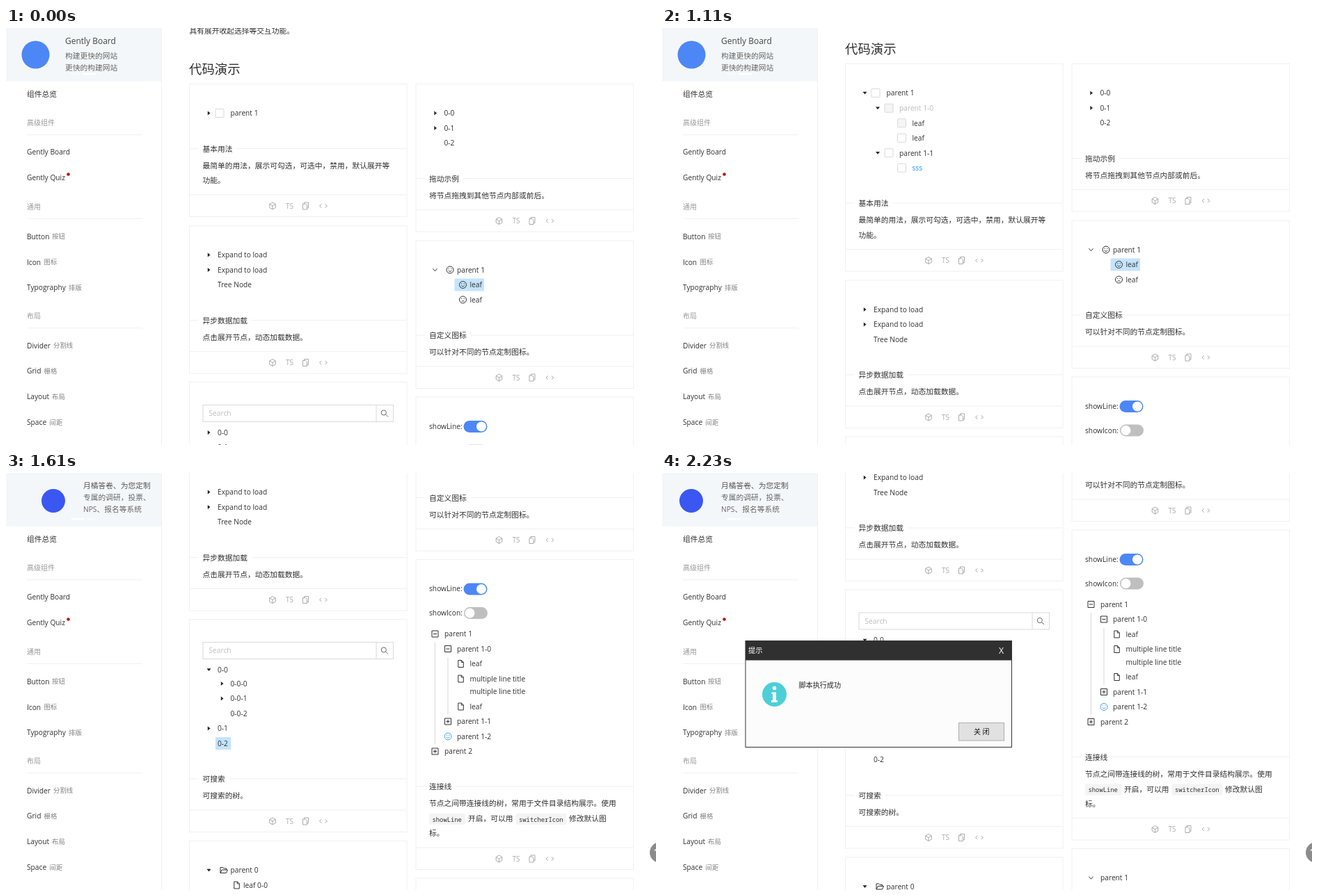
Animation, 934 px wide and 600 px high, one loop 2620 ms. Source, as an HTML page:

```html
<!DOCTYPE html>
<html lang="zh-CN">
<head>
<meta charset="utf-8">
<title>Tree</title>
<style>
html, body { margin: 0; width: 100%; height: 100%; overflow: hidden; background: #fff; }
#stage { display: block; width: 934px; height: 600px; font-family: "Open Sans", "Noto Sans CJK SC", "Noto Sans CJK", sans-serif; }
.mono { font-family: "Noto Sans Mono", "Noto Sans CJK SC", monospace; }
</style>
</head>
<body>
<svg id="stage" viewBox="0 0 934 600"></svg>
<script>
const LOOP = 2620, ROW = 21.5, EM = 10.75;
const INK = '#303030', SOFT = '#999', LINE = '#f0f0f0', BLUE = '#4c87f5', PICK = '#c5e4fd';

// time, scroll, first tree height, search tree height, banner offset, top button, picked row, dialog
const STEPS = [
  [0, 178, 0, 0, 224, 0, '0-2', 0],
  [610, 0, 0, 0, 224, 0, '0-2', 0],
  [810, 27, 30, 0, 224, 0, '0-2', 0],
  [910, 27, 74, 0, 224, 0, '0-2', 0],
  [1010, 27, 86, 0, 224, 0, '0-2', 0],
  [1110, 207, 107.5, 0, 224, 0, '0-2', 0],
  [1210, 400, 107.5, 0, 224, 0, '0-2', 0],
  [1310, 567, 107.5, 0, 224, 0, '0-2', 0],
  [1410, 584.5, 107.5, 0, 224, 0, '0-2', 0],
  [1510, 584.5, 107.5, 45, 120, 1, '0-2', 0],
  [1610, 584.5, 107.5, 63, 26, 1, '0-2', 0],
  [1710, 627, 107.5, 64.5, 0, 1, '0-2', 0],
  [1810, 627, 107.5, 119.5, 0, 1, '0-2', 0],
  [1910, 627, 107.5, 129, 0, 1, '0-2', 0],
  [2030, 627, 107.5, 129, 0, 1, '0-0-1-2', 0],
  [2130, 627, 107.5, 129, 0, 1, '0-0-1-2', 1]
];

// drawing helpers; text is placed by its middle height
function text(x, y, str, size = EM, fill = INK, more = '') {
  const body = str.replace(/[!-~][ -~]*/g, m => `<tspan font-size="${size * .95}">${m}</tspan>`);
  return `<text x="${x}" y="${y + size * .36}" font-size="${size}" fill="${fill}" ${more}>${body}</text>`;
}
const rect = (x, y, w, h, fill, more = '') =>
  `<rect x="${x}" y="${y}" width="${w}" height="${h}" fill="${fill}" ${more}/>`;
const circle = (x, y, r, fill, more = '') => `<circle cx="${x}" cy="${y}" r="${r}" fill="${fill}" ${more}/>`;
const path = (x, y, d, stroke, width = 1, fill = 'none') =>
  `<path transform="translate(${x} ${y})" d="${d}" stroke="${stroke}" stroke-width="${width}" fill="${fill}"/>`;
const hline = (x, y, w, color = LINE) => rect(x, y - .5, w, 1, color);
const move = (x, y, body) => `<g transform="translate(${x} ${y})">${body}</g>`;
const clip = (x, y, w, h, body) =>
  h > 0 ? `<svg x="${x}" y="${y}" width="${w}" height="${h}" overflow="hidden">${body}</svg>` : '';

function caret(x, y, open = 0) {
  const turn = open <= 0 ? -90 : open < .95 ? -38 : 0;
  return `<path transform="translate(${x} ${y}) rotate(${turn})" d="M-3-1.7H3L0 2z" fill="#222"/>`;
}
const chevron = (x, y) => path(x, y, 'M-3-1.8L0 1.8L3-1.8', '#333');
const box = (x, y, off) => rect(x - 6, y - 6, 12, 12, off ? '#f5f5f5' : '#fff', 'stroke="#d9d9d9" rx="1"');
const file = (x, y) => path(x, y, 'M-3.7-5H1L3.8-2.2V5H-3.7zM.8-5V-2H3.8', INK);
const folder = (x, y) => path(x, y, 'M-5 4V-4H-1.5L0-2.5H3.5V-.5M-5 4L-2.8-.5H5.5L3.5 4z', INK);
const square = (x, y, plus) =>
  path(x, y, 'M-4.5-4.5H4.5V4.5H-4.5zM-2.5 0H2.5' + (plus ? 'M0-2.5V2.5' : ''), INK);
const face = (x, y, sad, color = INK) => circle(x, y, 5, 'none', `stroke="${color}"`) +
  path(x, y, 'M-2.4-1.6H-1.2M1.2-1.6H2.4' + (sad ? 'M-2 2.6Q0 .2 2 2.6' : 'M-2.4 .8Q0 4 2.4 .8'), color);
const toggle = (x, y, on) => rect(x, y - 8.5, 34, 17, on ? BLUE : '#bfbfbf', 'rx="8.5"') +
  circle(on ? x + 25.5 : x + 8.5, y, 7, '#fff');
const chip = (x, y, w, str, size) => rect(x, y - 8, w, 16, '#f4f4f4', 'rx="2"') +
  text(x + 4.5, y + .5, str, size, INK, 'class="mono"');

function card(x, top, h, title, lines, body) {
  const end = top + h, cy = end - 15.5, name = end - 76 - ROW * (lines.length - 1);
  return rect(x, top, 312.5, h, '#fff', `stroke="${LINE}"`) +
    hline(x, name - .5, 312) + rect(x + 13, name - 6, title.length * EM + 12, 12, '#fff') +
    text(x + 19, name, title) +
    lines.map((s, i) => text(x + 19, name + 24 + ROW * i, s)).join('') +
    hline(x, end - 31.5, 312) +
    path(x + 119.5, cy, 'M0-5L4.3-2.5V2.5L0 5L-4.3 2.5V-2.5zM-4.3-2.5L0 0L4.3-2.5M0 0V5', '#aaa') +
    text(x + 138.5, cy, 'TS', 10.5, '#aaa') +
    path(x + 167, cy, 'M-2-3V-5H4V3H2M-4-3H0L2-1V5H-4z', '#aaa') +
    path(x + 192.5, cy, 'M-2.5-2.5L-5.5 0L-2.5 2.5M2.5-2.5L5.5 0L2.5 2.5', '#aaa') +
    move(x, top, body);
}

function advert() {
  let s = rect(626, 15.5, 268, 91.5, '#f4f8fb') + rect(633.5, 23, 99.5, 76.5, '#14173a');
  s += path(633.5, 99, 'M0-15Q6-20 12-16T26-15T40-22T54-17T68-18T84-12T99-16V0H0z', '#3f6fd0', .8, '#1c2f66');
  s += `<ellipse cx="713" cy="86" rx="11" ry="6" fill="#2f78cf"/><ellipse cx="713" cy="79" rx="10" ry="6" fill="#57b4ee"/>`;
  s += circle(726, 86, 4, '#f0a24a');
  for (let i = 0; i < 5; i++) s += rect(729, 34 + i * 4, 2.5, 2, '#5fa8e8');
  s += circle(659.5, 46.5, 6, '#fff') + text(668, 46.5, 'MoruPlot', 11.6, '#fff', 'font-weight="700"');
  s += text(638.5, 62.5, '人人可用', 9.5, '#7cc4ff', 'font-weight="700"') +
    text(679, 62.5, '的开源BI工具', 9.2, '#fff', 'font-weight="700"');
  s += rect(741.5, 25, 11, 11, '#fff', 'stroke="#8a9aa5"') + rect(743, 30, 2, 5, '#3f8f5a') +
    rect(746, 27, 2, 8, '#3573c0') + rect(749, 29, 2, 6, '#c0504a');
  s += text(757, 30.5, '个个会做图表小能手', EM, '#222', 'font-weight="700"') + text(854.5, 30.5, '。仅');
  s += text(741, 46.5, '需 5 分钟，数据变图表。众多') + text(741, 62, '精美') +
    text(765.5, 62, 'BI', EM, '#222', 'font-weight="700"') + text(779, 62, '大屏模板等你来选。');
  s += path(745, 87, 'M-3.5 3.5L0-4L3.5 3.5M-4 3.5H0M1 3.5H4M0-1V2', '#999', .9);
  return s + text(752, 87.5, '广告', 9.2, SOFT) + path(886, 100, 'M-2-2L2 2M2-2L-2 2', '#999', .9);
}

const intro = () =>
  text(263.5, 8, 'Tree', 23.5, INK, 'font-weight="600"') + text(322, 8, '树形控件', 23) +
  text(263.5, 47.5, '多层次的结构列表。') + advert() + text(263, 129, '何时使用', 18.4) +
  text(263.5, 161, '文件夹、组织架构、生物分类、国家地区等等，世间万物的大多数结构都是树形结构。使用') +
  chip(693.5, 162, 41.5, '树控件', 10.5) + text(735.5, 161, '可以完整展现其中的层级关系，并') +
  text(263.5, 182.5, '具有展开收起选择等交互功能。') + text(263, 237, '代码演示', 18.4);

function checkTree(h) {
  const kids = [
    [62.5, 'parent 1-0', 1, 1], [81, 'leaf', 0, 1], [81, 'leaf', 0, 0],
    [62.5, 'parent 1-1', 1, 0], [81, 'sss', 0, 0]
  ].map(([x, name, branch, off], i) => {
    const y = ROW * (i + .5);
    return (branch ? caret(x - 16, y, i == 3 ? +(h > 86) : 1) : '') + box(x, y, off) +
      text(x + 15, y, name, EM, off && branch ? '#bbb' : name == 'sss' ? '#1890ff' : INK);
  }).join('');
  const open = Math.min(1, h / 86);
  return caret(28, 42, open) + box(43.5, 42) + text(59, 42, 'parent 1') +
    clip(0, 53, 300, h, `<g opacity="${open}">${move(0, Math.min(0, h - 86), kids)}</g>`);
}

function searchTree(h, picked) {
  const full = ROW * 3, deep = Math.max(0, h - full), open = Math.min(1, h / full), half = ROW / 2;
  const node = (x, y, name) => (name == picked ? rect(x - 3, y - 9, name.length * 5.6 + 5.5, 18, PICK) : '') +
    text(x, y, name);
  const leaves = [0, 1, 2].map(i => node(77.5, half + ROW * i, '0-0-1-' + i)).join('');
  const kids = caret(47, half) + node(59, half, '0-0-0') +
    caret(47, half + ROW, deep / full) + node(59, half + ROW, '0-0-1') +
    clip(0, ROW * 2, 300, deep, `<g opacity="${deep / full}">${move(0, deep - full, leaves)}</g>`) +
    node(59, half + ROW * 2 + deep, '0-0-2');
  return rect(19.5, 33, 273.5, 24, '#fff', 'stroke="#d9d9d9"') + rect(268, 33, 1, 24, '#d9d9d9') +
    text(28, 45, 'Search', EM, '#bfbfbf') +
    path(280.5, 45, 'M1.8 1.8L5 5M2.4-1A3.6 3.6 0 1 1-4.8-1A3.6 3.6 0 1 1 2.4-1', '#666') +
    caret(28, 72.5, open) + node(40.5, 72.5, '0-0') +
    clip(0, 83.2, 300, h, `<g opacity="${open}">${move(0, Math.min(0, h - full), kids)}</g>`) +
    caret(28, 94 + h) + node(40.5, 94 + h, '0-1') + node(40.5, 115.5 + h, '0-2');
}

const plainTree = names => names.map((n, i) =>
  (i < 2 ? caret(28, 42 + ROW * i) : '') + text(40.5, 42 + ROW * i, n)).join('');

const iconTree = () => chevron(27.5, 42) + face(49, 42) + text(59, 42, 'parent 1') +
  rect(55.5, 54.5, 42.5, 18, PICK) + face(67.5, 63.5) + text(77.5, 63.5, 'leaf') +
  face(67.5, 85, 1) + text(77.5, 85, 'leaf');

function lineTree() {
  const label = (x, y, s) => text(x, y, s);
  return text(19, 42, 'showLine:') + toggle(68.5, 42.5, 1) + text(19, 77, 'showIcon:') + toggle(69, 77, 0) +
    rect(27, 119, 1, 147, '#d9d9d9') + rect(45.5, 141, 1, 82, '#d9d9d9') +
    square(27.5, 107) + label(41, 107, 'parent 1') + square(46, 128.5) + label(59, 128.5, 'parent 1-0') +
    file(64.5, 150) + label(77.5, 150, 'leaf') + file(64.5, 171.5) + label(77.5, 171.5, 'multiple line title') +
    label(77.5, 190, 'multiple line title') + file(64.5, 211.5) + label(77.5, 211.5, 'leaf') +
    square(46, 233, 1) + label(59, 233, 'parent 1-1') + face(46, 254.5, 0, '#4a9df0') + label(59, 254.5, 'parent 1-2') +
    square(27.5, 276, 1) + label(41, 276, 'parent 2') +
    chip(19, 373.5, 52.5, 'showLine', 9.3) + text(75, 373, '开启，可以用') +
    chip(143.5, 373.5, 73, 'switcherIcon', 9.3) + text(220, 373, '修改默认图');
}

const folderTree = () => [0, 3].map((r, i) => {
  const y = 42 + ROW * r;
  return caret(28, y, 1) + folder(49.5, y) + text(59, y, 'parent ' + i) + [0, 1].map(k =>
    file(68, y + ROW * (k + 1)) + text(77.5, y + ROW * (k + 1), `leaf ${i}-${k}`)).join('');
}).join('');

function page(h1, h2, picked) {
  const L = 263.5, R = 589;
  return intro() +
    card(L, 258.5, 191 + h1, '基本用法', ['最简单的用法，展示可勾选，可选中，禁用，默认展开等', '功能。'], checkTree(h1)) +
    card(L, 462.5 + h1, 212.5, '异步数据加载', ['点击展开节点，动态加载数据。'],
      plainTree(['Expand to load', 'Expand to load', 'Tree Node'])) +
    card(L, 687.5 + h1, 243 + h2, '可搜索', ['可搜索的树。'], searchTree(h2, picked)) +
    card(L, 943.5 + h1 + h2, 300, '目录', ['内置的目录树。'], folderTree()) +
    card(R, 258.5, 212.5, '拖动示例', ['将节点拖拽到其他节点内部或前后。'], plainTree(['0-0', '0-1', '0-2'])) +
    card(R, 484, 212.5, '自定义图标', ['可以针对不同的节点定制图标。'], iconTree()) +
    card(R, 709, 446, '连接线', ['节点之间带连接线的树，常用于文件目录结构展示。使用', '', '标。'], lineTree()) +
    card(R, 1167.5, 300, '虚拟滚动', ['使用高度属性。'], chevron(27.5, 42) + text(41, 42, 'parent 1'));
}

function banner(shift) {
  const first = circle(42.5, 38.5, 20, BLUE) + text(85, 18, 'Gently Board', 12.6, '#444') +
    text(85, 40, '构建更快的网站', EM, '#666') + text(85, 57, '更快的构建网站', EM, '#666');
  const second = circle(42, 40, 17, '#3b57f2') + text(85, 18.5, '月橘答卷、为您定制', EM, '#555', 'font-weight="500"') +
    text(85, 35.5, '专属的调研，投票、', EM, '#666') + text(85, 52.5, 'NPS、报名等系统', EM, '#666');
  const late = shift < 120;
  return clip(0, 0, 223, 77, rect(0, 0, 223, 77, '#f4f7fa') +
    move(shift - 224, 0, first) + move(shift, 0, second) +
    rect(94, 65, late ? 18.5 : 12.5, 2.3, '#fff', `opacity="${late ? 1 : .4}"`) +
    rect(late ? 116 : 110, 65, late ? 12.5 : 18.5, 2.3, '#fff', `opacity="${late ? .4 : 1}"`));
}

function sidebar(shift) {
  const group = (y, s) => text(30, y, s, 10, SOFT) + hline(30, y + 17.3, 166);
  const item = (y, en, x, zh) => text(30, y, en) + (zh ? text(x, y, zh, 9.4, '#808080') : '');
  return rect(0, 0, 223, 600, '#fff') + rect(223, 0, 1, 600, LINE) + banner(shift) +
    item(95.5, '组件总览') + group(136.5, '高级组件') + item(178.5, 'Gently Board') + item(215.5, 'Gently Quiz') +
    circle(89.5, 210.5, 2.3, '#b81414') + group(257, '通用') + item(300, 'Button', 66, '按钮') +
    item(337, 'Icon', 54.5, '图标') + item(373.5, 'Typography', 90, '排版') + group(414.5, '布局') +
    item(457, 'Divider', 68, '分割线') + item(493.5, 'Grid', 54.5, '栅格') +
    item(530.5, 'Layout', 66, '布局') + item(567.5, 'Space', 62.5, '间距');
}

const topButton = () => circle(940, 546, 15, '#8c8c8c') + path(936, 546, 'M-4-2.5L0-6L4-2.5M0-6V6', '#fff', 1.5);

const dialog = () => rect(120, 241.5, 382.5, 153, '#fcfcfc', 'stroke="#333"') + rect(120, 242, 382, 27.5, '#303030') +
  text(124, 255.5, '提示', 10.3, '#fff') + text(484, 255, 'X', 13, '#fff') +
  circle(161.5, 318.5, 17.5, '#4dcfd8') + circle(161.5, 309.5, 2.8, '#fff') +
  path(161.5, 322, 'M-4-6.5H2.5V5H4.5V8H-4.5V5H-2.5V-4H-4z', 'none', 0, '#fff') +
  text(196.5, 305.5, '脚本执行成功', 10.1, '#222') +
  rect(426.5, 359.5, 65, 25.5, '#e1e1e1', 'stroke="#adadad"') + text(448, 372.5, '关', 10, '#111') + text(460.5, 372.5, '闭', 10, '#111');

const stage = document.getElementById('stage'), start = performance.now();
let shown = null;

function draw(now) {
  const t = Math.max(0, now - start) % LOOP;
  const step = STEPS.filter(s => s[0] <= t).pop();
  if (step !== shown) {
    shown = step;
    const [, scroll, h1, h2, shift, button, picked, done] = step;
    stage.innerHTML = move(0, -scroll, page(h1, h2, picked)) + sidebar(shift) +
      (button ? topButton() : '') + (done ? dialog() : '');
  }
  requestAnimationFrame(() => draw(performance.now()));
}
draw(start);
</script>
</body>
</html>
```
